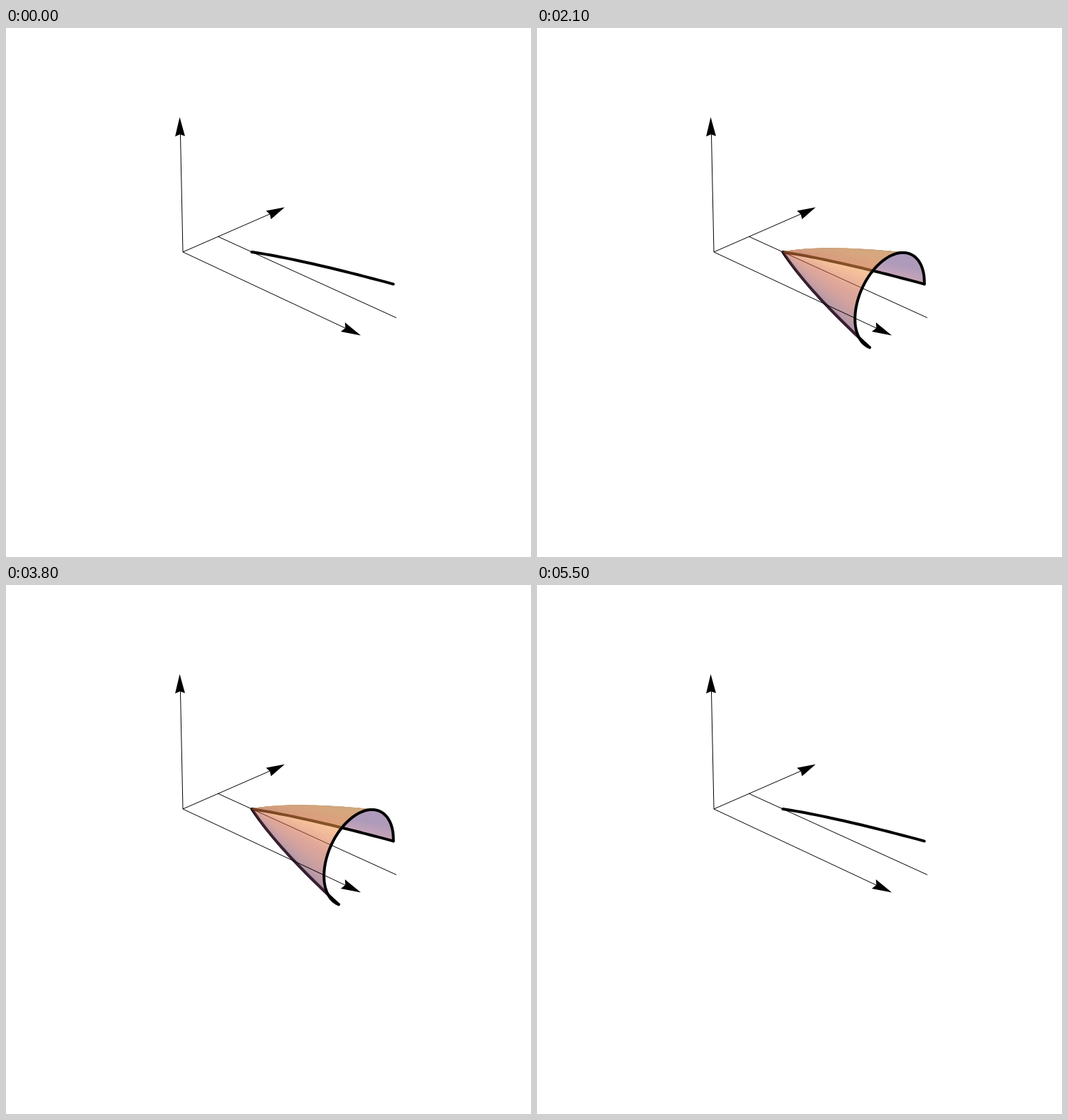
Write an HTML page that moves like this. It is 745x751 px and loops after 6 s.

```html
<!DOCTYPE html>
<html lang="en">
<head>
<meta charset="utf-8">
<title>Surface of revolution</title>
<style>
html, body { margin: 0; width: 100%; height: 100%; overflow: hidden; background: #fff; }
svg { display: block; width: 745px; height: 751px; }
.thin { fill: none; stroke: #000; stroke-width: 1; }
.bold { fill: none; stroke: #000; stroke-width: 4; stroke-linecap: round; stroke-linejoin: round; }
.skin { opacity: .55; stroke-width: .7; stroke-linejoin: round; }
</style>
</head>
<body>
<svg viewBox="0 0 745 751">
  <g id="back" class="skin"></g>
  <path id="axis" class="thin"/>
  <path id="hidden" class="bold"/>
  <g id="front" class="skin"></g>
  <path id="edges" class="bold"/>
  <path id="frame" class="thin"/>
  <path d="M246.5 126.5L254 153.5L247 151L240 154Z M503.5 436.5L481 418L481.5 426L475 431Z M395.5 254.5L369 259.5L374.5 264.5L376 271.5Z"/>
</svg>
<script>
const UNIT = 69.2, DIST = 3027, CX = 372, CY = 375;
const COS = 0.883, SIN = 0.469, H = Math.SQRT1_2;
const el = id => document.getElementById(id);

// World direction to camera space: right, up, towards the viewer.
const turn = ([x, y, z]) => [
  H * (x + y),
  -SIN * H * (x - y) + COS * z,
  COS * H * (x - y) + SIN * z
];
const view = p => {
  const [r, u, v] = turn(p.map(c => c * UNIT));
  return [r - 121, u + 57, v];
};
const project = p => {
  const [r, u, v] = view(p), s = DIST / (DIST - v);
  return (CX + r * s).toFixed(2) + ' ' + (CY - u * s).toFixed(2);
};
const poly = pts => 'M' + pts.map(project).join('L');
const dot = (a, b) => a[0] * b[0] + a[1] * b[1] + a[2] * b[2];
const unit = a => a.map(c => c / Math.hypot(...a));

// The curve y = sqrt(x), 1 <= x <= 4, turned about the line y = 1; q = sqrt(x).
const point = (q, a) => [q * q, 1 + (q - 1) * Math.cos(a), (q - 1) * Math.sin(a)];
const normal = (q, a) => unit(turn([-0.5 / q, Math.cos(a), Math.sin(a)]));
const range = (n, f) => Array.from({ length: n + 1 }, (_, i) => f(i / n));
const profile = a => poly(range(24, s => point(1 + s, a)));

const lights = [
  [[1.5, -0.5, 1.5], [0, 0.18, 0.5]],
  [[1.5, 1.5, 1.5], [0.18, 0.5, 0.18]],
  [[-0.5, 1.5, 1.5], [0.5, 0.18, 0]]
].map(([dir, rgb]) => [unit(dir), rgb]);

function shade(n) {
  const c = [0.42, 0.24, 0.3 - 0.13 * n[1]];
  for (const [dir, rgb] of lights) {
    const k = Math.max(0, dot(n, dir));
    rgb.forEach((x, i) => c[i] += x * k);
  }
  return 'rgb(' + c.map(x => Math.round(255 * Math.min(1, x))) + ')';
}

function facing(q, a) {
  const p = view(point(q, a));
  return dot(normal(q, a), [-p[0], -p[1], DIST - p[2]]) > 0;
}

function skin(end) {
  const out = { back: '', front: '' };
  const cols = Math.max(1, Math.ceil(end / 0.07)), rows = 10, da = end / cols;
  for (let i = 0; i < cols; i++) for (let j = 0; j < rows; j++) {
    const a = i * da, q = 1 + j / rows, q2 = q + 1 / rows;
    const qm = q + 0.5 / rows, am = a + da / 2;
    const outer = facing(qm, am), n = normal(qm, am);
    const c = shade(outer ? n : n.map(x => -x));
    const d = poly([point(q, a), point(q2, a), point(q2, a + da), point(q, a + da)]);
    out[outer ? 'front' : 'back'] += `<path d="${d}Z" fill="${c}" stroke="${c}"/>`;
  }
  return out;
}

function draw(step) {
  const end = Math.max(0, 0.2535 * step - 0.2);
  const { back, front } = end ? skin(end) : { back: '', front: '' };
  el('back').innerHTML = back;
  el('front').innerHTML = front;
  const rim = poly(range(80, s => point(2, s * end)));
  const last = profile(end), near = facing(1.6, end);
  el('hidden').setAttribute('d', profile(0) + (near ? '' : last));
  el('edges').setAttribute('d', (end ? rim : '') + (near ? last : ''));
}

function stepAt(t) {
  if (t < 500) return 0;
  if (t < 3100) return Math.min(25, Math.floor((t - 500) / 100) + 1);
  return Math.max(0, 24 - Math.floor((t - 3100) / 100));
}

const O = [0, 0, 0];
el('frame').setAttribute('d', poly([O, [4.7, 0, 0]]) + poly([O, [0, 2.6, 0]]) + poly([O, [0, 0, 2.7]]));
el('axis').setAttribute('d', poly([[0, 1, 0], [4.98, 1, 0]]));

let shown = -1;
function tick() {
  const step = stepAt(performance.now() % 6000);
  if (step !== shown) draw(shown = step);
  requestAnimationFrame(tick);
}
tick();
</script>
</body>
</html>
```
